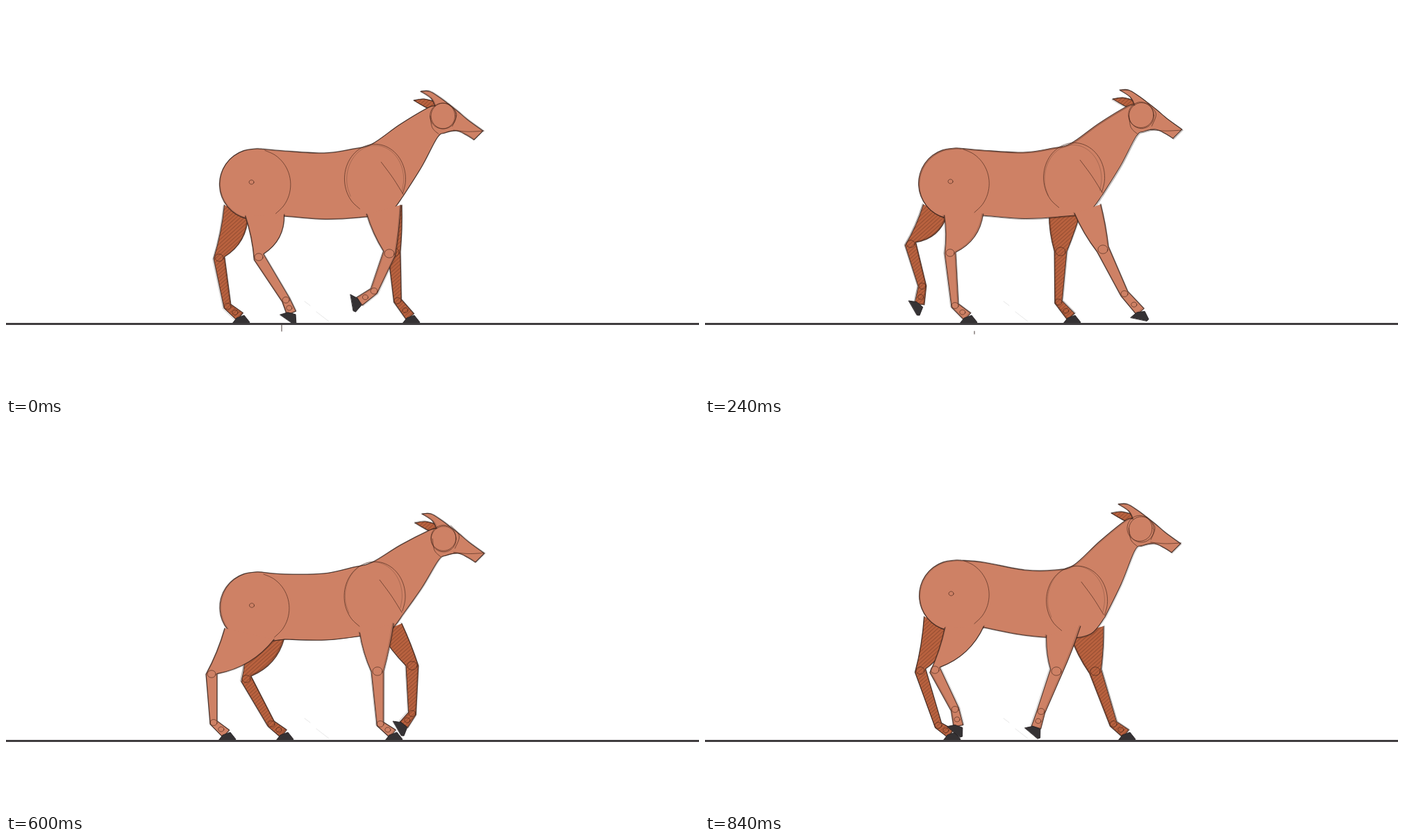
Write an HTML page that moves like this. It is 998 px wide and 561 px high and loops after 0.96 s.

```html
<!DOCTYPE html>
<html lang="en">
<head>
<meta charset="utf-8">
<title>Walk cycle</title>
<style>
  html, body { margin: 0; width: 100%; height: 100%; overflow: hidden; background: #fff; }
  svg { display: block; width: 998px; height: 561px; }
  .drawing { visibility: hidden; animation: show 960ms step-end infinite; }
  @keyframes show { 0% { visibility: visible; } 12.5%, 100% { visibility: hidden; } }
  path { stroke-linejoin: round; stroke-linecap: round; }
  .skin { fill: #ce8165; }
  .shade { fill: url(#hatch); }
  .hoof { fill: #353234; stroke: #242022; stroke-width: .8; }
  .ink { fill: none; stroke: #2e1f1b; stroke-width: 1.1; opacity: .8; }
  .sketch { fill: none; stroke: #36211b; stroke-width: .7; opacity: .35; }
  .detail { fill: none; stroke: #45251b; stroke-width: .9; opacity: .7; }
</style>
</head>
<body>
<svg viewBox="0 0 998 561">
  <defs>
    <pattern id="hatch" width="4" height="4" patternUnits="userSpaceOnUse" patternTransform="rotate(48)">
      <rect width="4" height="4" fill="#b9623f"/>
      <rect width="1.1" height="4" fill="#82432b" opacity=".65"/>
    </pattern>
  </defs>
  <g id="stage"></g>
  <path d="M430 426L438 432M447 441L465 455" stroke="#ddd" stroke-width=".7"/>
  <rect y="457" width="998" height="3" fill="#403d3f"/>
</svg>
<script>
const STEPS = 8, STEP_MS = 120, SOLE = 448;

// The trunk repeats every half cycle.
const trunks = [
  { hip: [358.5, 257], shoulder: [531, 249], head: [629, 159], tick: "M397 460V469" },
  { hip: [359, 266], shoulder: [531, 251], head: [631, 167] },
  { hip: [358.5, 256], shoulder: [531, 248], head: [629, 157], tick: "M388 469V473" },
  { hip: [359.5, 249], shoulder: [535, 255], head: [627, 153] }
];

// One full stride per leg; the far leg runs half a cycle behind.
// A leg without a foot stands flat on the ground.
const hindStride = [
  { knee: [364, 362], fetlock: [403, 424], foot: [411, 443], tilt: 35 },
  { knee: [346, 369], fetlock: [382, 434] },
  { knee: [353, 356], fetlock: [360, 432] },
  { knee: [310, 357], fetlock: [336, 436] },
  { knee: [307, 363], fetlock: [319, 433] },
  { knee: [296, 362], fetlock: [299, 432] },
  { knee: [296, 343], fetlock: [313, 404], foot: [309, 430], tilt: 60 },
  { knee: [331, 356], fetlock: [360, 413], foot: [365, 437], tilt: 40 }
];
const foreStride = [
  { knee: [552, 357], fetlock: [530, 411], foot: [509, 426], tilt: 80 },
  { knee: [585, 350], fetlock: [585, 419], foot: [573, 435], tilt: 60 },
  { knee: [573, 351], fetlock: [604, 415], foot: [627, 441], tilt: 12 },
  { knee: [562, 358], fetlock: [588, 434] },
  { knee: [559, 355], fetlock: [564, 425] },
  { knee: [535, 358], fetlock: [539, 434] },
  { knee: [512, 354], fetlock: [509, 427] },
  { knee: [506, 358], fetlock: [484, 416], foot: [477, 439], tilt: 40 }
];

let seed = 7;
const random = () => (seed = seed * 16807 % 2147483647) / 2147483647;
const wobble = size => (random() - .5) * 2 * size;

const move = ([x, y], dx, dy) => [x + dx, y + dy];
const mix = (a, b, t) => [a[0] + (b[0] - a[0]) * t, a[1] + (b[1] - a[1]) * t];
const shift = (p, n, size) => move(p, n[0] * size, n[1] * size);

// Unit vector pointing to the rear of a bone that runs from a to b.
function rearOf(a, b) {
  const dx = b[0] - a[0], dy = b[1] - a[1], length = Math.hypot(dx, dy);
  return [-dy / length, dx / length];
}

function arc([x, y], rx, ry, from, to) {
  const count = Math.ceil(Math.abs(to - from) / 20);
  return Array.from({ length: count + 1 }, (_, i) => {
    const angle = (from + (to - from) * i / count) * Math.PI / 180;
    return [x + rx * Math.cos(angle), y + ry * Math.sin(angle)];
  });
}

// Smooth curves, joined by a sharp corner between one run and the next.
function smooth(...runs) {
  const handle = (p, a, b) => p.map((v, k) => v + (b[k] - a[k]) / 6);
  return runs.map((run, r) => {
    const points = r ? [runs[r - 1].at(-1), ...run] : run;
    const at = i => points[Math.max(0, Math.min(points.length - 1, i))];
    const curves = points.slice(1).map((q, i) =>
      `C${handle(at(i), at(i - 1), q)} ${handle(q, at(i + 2), at(i))} ${q}`);
    return (r ? "" : "M" + points[0]) + curves.join("");
  }).join("");
}

const path = (type, d, extra = "") => `<path class="${type}" d="${d}" ${extra}/>`;
const loose = (type, d) => path(type, d, `transform="translate(${wobble(1.6)} ${wobble(1.4)})"`);
const shape = (fill, d) => path(fill, d) + path("ink", d) + loose("sketch", d) + loose("sketch", d);
const ring = (center, r) => path("detail", smooth(arc(center, r, r * .88, 0, 380)));

function hoof(foot, tilt) {
  const outline = "M-12 11L-5 2L6 -2L14 8L12 11Z";
  return path("hoof", outline, `transform="translate(${foot}) rotate(${tilt})"`);
}

function leg({ knee, fetlock, foot = [fetlock[0] + 18, SOLE], tilt = 0 }, roots, width, bulge, fill) {
  const shin = rearOf(knee, fetlock), pastern = rearOf(fetlock, foot);
  const bend = mix(shin, pastern, .5);
  const side = (root, sign, swell) => {
    const top = shift(knee, shin, sign * width);
    const control = shift(mix(root, top, .5), rearOf(root, top), sign * swell * 2);
    return { root, control, top, low: shift(fetlock, bend, sign * 6), end: shift(foot, pastern, sign * 7) };
  };
  const rear = side(roots[0], 1, bulge[0]), front = side(roots[1], -1, bulge[1]);
  const d = `M${rear.root}Q${rear.control} ${rear.top}L${rear.low}L${rear.end}`
    + `L${front.end}L${front.low}L${front.top}Q${front.control} ${front.root}`;
  return shape(fill, d) + hoof(foot, tilt)
    + ring(knee, width - 2) + ring(fetlock, 5) + ring(mix(fetlock, foot, .6), 4);
}

function hindLeg(pose, { hip }, near) {
  const trailing = pose.knee[0] < 320;
  const rear = trailing ? move(hip, -44, 30) : move(hip, -14, 46);
  const front = trailing ? move(hip, near ? 27 : -10, 46) : move(hip, 42, 44);
  return leg(pose, [rear, front], 8, [-2, 9], near ? "skin" : "shade");
}

function foreLeg(pose, { shoulder }, near) {
  const x = 520 + (pose.knee[0] - 553) * .6;
  const roots = [[x, shoulder[1] + 51], [Math.min(x + 49, shoulder[0] + 39), shoulder[1] + 38]];
  return leg(pose, roots, 9, [2, 1], near ? "skin" : "shade");
}

function trunk({ hip, shoulder, head }) {
  const on = (base, ...offsets) => offsets.map(([dx, dy]) => move(base, dx, dy));
  const withers = move(shoulder, -4, -50), nape = move(head, -22, -12);
  const throat = move(head, -8, 31), chest = move(shoulder, 41, 25);
  const elbow = move(shoulder, -11, 55), flank = move(hip, 42, 46);
  const rump = move(hip, 8, -51);
  const ear = smooth(on(head, [-8, -20], [-27, -25], [-42, -23]), on(head, [-32, -17], [-20, -11], [-8, -10]));
  const body = smooth(
    [rump, move(hip, 42, -48), move(mix(rump, withers, .57), 0, 10), move(shoulder, -31, -43), withers,
      move(mix(withers, nape, .5), 0, -2), nape, move(head, -11, -15)],
    on(head, [-17, -26], [-32, -36]),
    on(head, [-19, -36], [-4, -27], [8, -18], [22, -7], [36, 5], [58, 21]),
    on(head, [45, 34]),
    [...on(head, [34, 27], [20, 21], [3, 24]), throat, move(mix(throat, chest, .5), 2, 0), chest],
    [move(shoulder, 21, 49), elbow, move(mix(elbow, flank, .5), 0, 4), flank],
    [...arc(hip, 51, 51, 85, 270), rump]
  );
  return shape("shade", ear) + shape("skin", body);
}

function construction({ hip, shoulder, head, tick }) {
  const lines = [
    arc(hip, 50, 51, -75, 55),
    arc(shoulder, 44, 50, 120, 385),
    [move(shoulder, 8, -25), move(shoulder, 25, -2), move(shoulder, 40, 22)],
    arc(head, 18, 18.5, 0, 360),
    arc(head, 18, 18.5, 0, 360),
    [move(head, -17, 0), move(head, -14, 17), move(head, -5, 26)],
    [move(head, 8, -18), move(head, 20, -3), move(head, 14, 15)],
    [move(head, 14, 20), move(head, 35, 22), move(head, 58, 21)]
  ];
  return lines.map(points => loose("detail", smooth(points))).join("")
    + loose("sketch", smooth(arc(shoulder, 41, 49, 150, 380)))
    + ring(move(hip, -5, -3), 3.5)
    + (tick ? path("ink", tick) : "");
}

function drawing(step) {
  const base = trunks[step % trunks.length], half = (step + STEPS / 2) % STEPS;
  return hindLeg(hindStride[half], base, false) + foreLeg(foreStride[half], base, false)
    + trunk(base)
    + hindLeg(hindStride[step], base, true) + foreLeg(foreStride[step], base, true)
    + construction(base);
}

document.getElementById("stage").innerHTML = Array.from({ length: STEPS }, (_, i) => {
  const delay = i ? (i - STEPS) * STEP_MS : 0;
  return `<g class="drawing" style="animation-delay:${delay}ms">${drawing(i)}</g>`;
}).join("");
</script>
</body>
</html>
```
